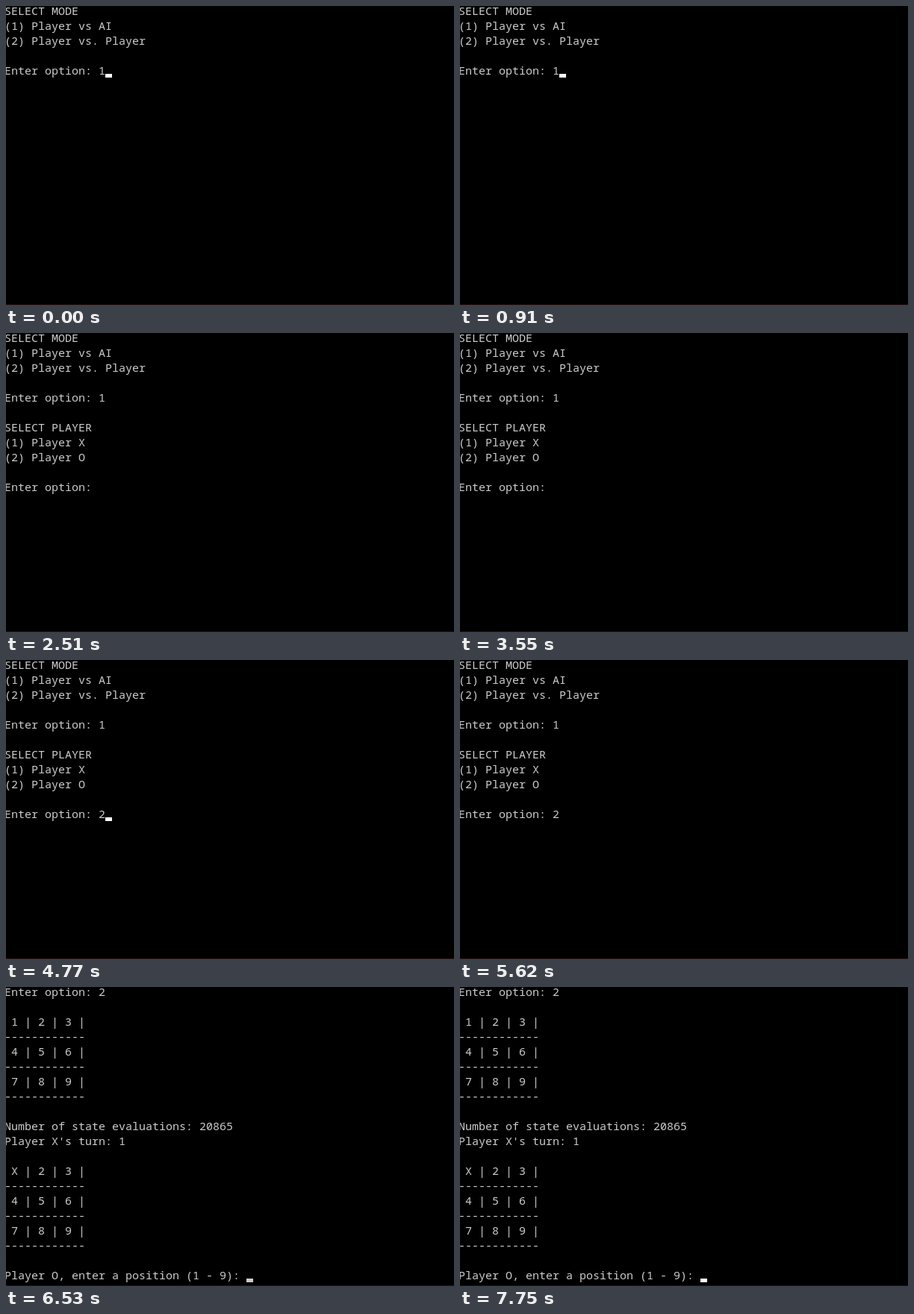
Recreate the animation shown at these times as an HTML page with a canvas. Size 600x401 px, loop 8 s.

```html
<!DOCTYPE html>
<html lang="en">
<head>
<meta charset="utf-8">
<title>Tic-tac-toe console</title>
<style>
  html, body { margin: 0; height: 100%; overflow: hidden; background: #000; }
  canvas { display: block; }
</style>
</head>
<body>
<canvas id="stage" width="600" height="401"></canvas>
<script>
const ctx = document.getElementById("stage").getContext("2d");
const LOOP = 8000, COL = 9, ROW = 20, LEFT = -2;

const board = first => {
  const rule = "-".repeat(12);
  return [` ${first} | 2 | 3 |`, rule, " 4 | 5 | 6 |", rule, " 7 | 8 | 9 |", rule];
};

const modeMenu = ["SELECT MODE", "(1) Player vs AI", "(2) Player vs. Player", "", "Enter option: 1"];
const playerMenu = [...modeMenu, "", "SELECT PLAYER", "(1) Player X", "(2) Player O", "", "Enter option: "];
const playerChosen = [...playerMenu.slice(0, -1), "Enter option: 2"];
const game = [
  "Enter option: 2", "", ...board("1"), "",
  "Number of state evaluations: 20865", "Player X's turn: 1", "",
  ...board("X"), "", "Player O, enter a position (1 - 9): "
];

// Each scene starts with its cursor on; blinks are the times it toggles.
const scenes = [
  { start: 0, lines: modeMenu, blinks: [380, 910, 1440] },
  { start: 1870, lines: [...modeMenu, ""], blinks: [] },
  { start: 1900, lines: playerMenu, blinks: [2510, 3010, 3550, 4060, 4600] },
  { start: 4770, lines: playerChosen, blinks: [5620, 6170] },
  { start: 6500, lines: [...playerChosen, ""], blinks: [] },
  { start: 6530, lines: game, blinks: [7210, 7750], firstCursor: "#ccc" }
];

function draw(time) {
  const { lines, blinks, firstCursor } = scenes.findLast(scene => time >= scene.start);

  ctx.fillStyle = "#000";
  ctx.fillRect(0, 0, 600, 401);
  ctx.fillStyle = "#241010";
  ctx.fillRect(0, 400, 600, 1);

  ctx.font = '15px "Noto Sans Mono", monospace';
  ctx.fillStyle = "#ccc";
  lines.forEach((line, row) => ctx.fillText(line, LEFT, 12 + row * ROW));

  const toggles = blinks.filter(blink => time >= blink).length;
  if (toggles % 2 === 0) {
    const row = lines.length - 1;
    ctx.fillStyle = toggles === 0 && firstCursor || "#fff";
    ctx.fillRect(LEFT + lines[row].length * COL, 11 + row * ROW, COL, 5);
  }
}

const origin = performance.now();
function tick() {
  draw((performance.now() - origin) % LOOP);
  requestAnimationFrame(tick);
}
tick();
</script>
</body>
</html>
```
